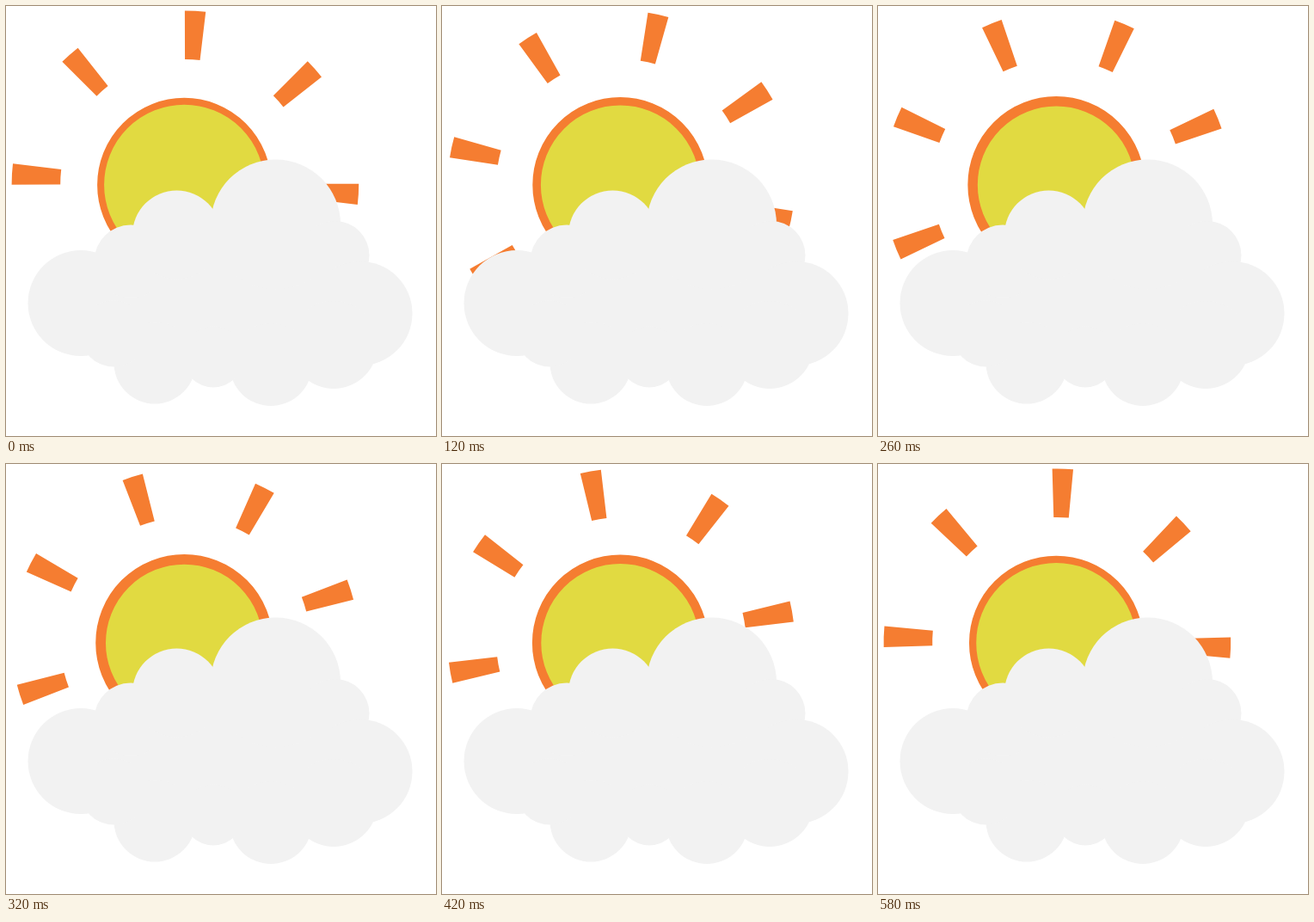
Write an HTML page with a canvas that moves like this. It is 500 px wide and 500 px high and loops after 0.6 s.

```html
<!DOCTYPE html>
<html lang="en">
<head>
<meta charset="utf-8">
<title>Sun behind a cloud</title>
<style>
  html, body { margin: 0; width: 100%; height: 100%; overflow: hidden; background: #fff; }
  canvas { display: block; }
</style>
</head>
<body>
<canvas id="stage" width="500" height="500"></canvas>
<script>
const ctx = document.getElementById('stage').getContext('2d');
const TAU = Math.PI * 2;
const LOOP = 600, STEP = 20;
const RAYS = 8, RAY_ANGLE = TAU / RAYS;
const ORANGE = '#f57d31', YELLOW = '#e1da41', GREY = '#f2f2f2';

function drawRays(turn) {
  const half = 0.0605;
  ctx.fillStyle = ORANGE;
  for (let i = 0; i < RAYS; i++) {
    const angle = turn + i * RAY_ANGLE;
    ctx.beginPath();
    ctx.arc(208.4, 207.2, 201.8, angle - half, angle + half);
    ctx.arc(208.4, 207.2, 145.2, angle + half, angle - half, true);
    ctx.fill();
  }
}

function drawDisc(border) {
  ctx.beginPath();
  ctx.arc(207.3, 208, 97.2, 0, TAU);
  ctx.fillStyle = YELLOW;
  ctx.fill();
  ctx.strokeStyle = ORANGE;
  ctx.lineWidth = border;
  ctx.stroke();
}

function puff(x, y, rx, ry = rx) {
  ctx.beginPath();
  ctx.ellipse(x, y, rx, ry, 0, 0, TAU);
  ctx.fill();
}

function drawCloud() {
  ctx.fillStyle = GREY;
  puff(245, 345, 170, 70); // core

  // Upper edge, left to right
  puff(87, 345.5, 61.5);
  puff(145, 297, 42.5);
  puff(198.5, 266, 51.5);
  puff(313.5, 254, 75.5);
  puff(382.5, 290, 40);
  puff(412, 357.5, 60.5);

  // Lower edge, right to left
  puff(381, 394, 51);
  puff(308, 417, 48);
  puff(241, 408, 35.5);
  puff(173, 415, 47.5);
  puff(125, 381, 38.5);
}

function draw(time) {
  const t = Math.floor((time % LOOP) / STEP) * STEP / LOOP;
  const pulse = 1 - Math.abs(2 * t - 1);
  ctx.fillStyle = '#fff';
  ctx.fillRect(0, 0, 500, 500);
  drawRays(0.058 + RAY_ANGLE * t);
  drawDisc(8 + 4 * pulse);
  drawCloud();
}

function tick() {
  draw(performance.now());
  requestAnimationFrame(tick);
}
tick();
</script>
</body>
</html>
```
